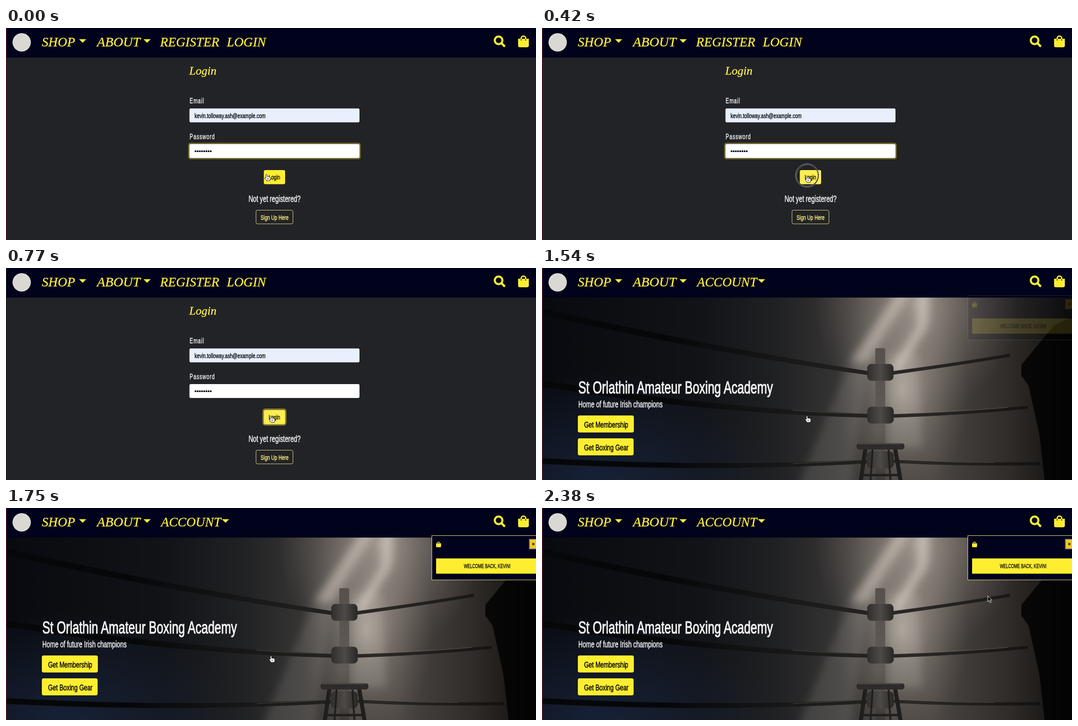
An HTML page for the animation above (2520 ms loop, 1183x473 px).

```html
<!DOCTYPE html>
<html lang="en">
<head>
<meta charset="utf-8">
<title>Login</title>
<style>
html, body { margin: 0; width: 100%; height: 100%; overflow: hidden; background: #222327; }
svg { display: block; width: 1183px; height: 473px; }
/* one condensed face for all body text */
.c {
  font-family: "Liberation Sans", Arial, sans-serif;
  transform: scaleX(.695); transform-box: fill-box; transform-origin: left;
  stroke: currentColor; stroke-width: .032em; fill: currentColor;
}
.m { text-anchor: middle; transform-origin: center; }
.label { font-size: 16px; letter-spacing: 1.4px; }
.s15 { font-size: 15px; }
.s19 { font-size: 19.2px; }
.script {
  font: italic 29px "Liberation Serif", "Times New Roman", serif;
  fill: #ffee2f; stroke: #ffee2f; stroke-width: .4px;
}
.y { fill: #ffee2f; }
.light { color: #f1f1f1; }
.dark { color: #08090c; }
</style>
</head>
<body>
<svg viewBox="0 0 1183 473">
  <defs>
    <linearGradient id="wall">
      <stop offset="0" stop-color="#080a0f"/>
      <stop offset=".3" stop-color="#111317"/>
      <stop offset=".45" stop-color="#212224"/>
      <stop offset=".6" stop-color="#3e3b39"/>
      <stop offset=".74" stop-color="#4b4642"/>
      <stop offset=".88" stop-color="#302c2a"/>
      <stop offset="1" stop-color="#0d0c0b"/>
    </linearGradient>
    <radialGradient id="glow">
      <stop offset="0" stop-color="#d5ccc1" stop-opacity=".62"/>
      <stop offset=".4" stop-color="#b5aaa0" stop-opacity=".36"/>
      <stop offset="1" stop-color="#8a8178" stop-opacity="0"/>
    </radialGradient>
    <radialGradient id="navy">
      <stop offset="0" stop-color="#1d2b49" stop-opacity=".7"/>
      <stop offset="1" stop-color="#1d2b49" stop-opacity="0"/>
    </radialGradient>
    <linearGradient id="post" x2="0" y2="1">
      <stop offset="0" stop-color="#55504b"/>
      <stop offset=".6" stop-color="#625c57"/>
      <stop offset="1" stop-color="#3a3735"/>
    </linearGradient>
    <linearGradient id="pad">
      <stop offset="0" stop-color="#302e2c"/>
      <stop offset=".5" stop-color="#4d4946"/>
      <stop offset="1" stop-color="#2a2826"/>
    </linearGradient>
    <linearGradient id="rope" gradientUnits="userSpaceOnUse" x1="0" x2="1110">
      <stop offset=".25" stop-color="#060708"/>
      <stop offset=".5" stop-color="#191919"/>
      <stop offset=".75" stop-color="#2b2927"/>
      <stop offset="1" stop-color="#141211"/>
    </linearGradient>
    <filter id="soft" x="-30%" y="-30%" width="160%" height="160%"><feGaussianBlur stdDeviation="9"/></filter>
    <clipPath id="stage"><rect y="66" width="1183" height="407"/></clipPath>
    <g id="bag">
      <path d="M0 8H24V23Q24 27 20 27H4Q0 27 0 23Z"/>
      <path d="M7 12V7a5 5 0 0 1 10 0V12" fill="none" stroke="#ffee2f" stroke-width="3"/>
      <path d="M7 9V12M17 9V12" stroke="#01031c" stroke-width="1.6"/>
    </g>
    <path id="caret" class="y" d="M0 0H16L8 8Z"/>
  </defs>

  <g id="form">
    <rect y="66" width="1183" height="407" fill="#222327"/>
    <text class="script" x="409" y="104" style="font-size:26px;fill:#fff15a">Login</text>
    <text class="c label light" x="410" y="168">Email</text>
    <rect x="409.5" y="179.5" width="379.5" height="31" rx="3" fill="#e8f0fe"/>
    <text class="c dark" x="421" y="201" font-size="15.2">kevin.tolloway.ash@example.com</text>
    <text class="c label light" x="410" y="248">Password</text>
    <rect id="fieldGlow" x="406.5" y="256" width="385.5" height="37" rx="5" fill="#6f672b"/>
    <rect x="409.5" y="259" width="379.5" height="31" rx="3" fill="#fff"/>
    <path d="M423 275H458" stroke="#08090c" stroke-width="4.2" stroke-linecap="round" stroke-dasharray="0 4.86"/>
    <rect id="btnGlow" x="572.5" y="313.5" width="53.5" height="38" rx="6" fill="#857c2e"/>
    <rect id="btn" x="575.5" y="317" width="47.5" height="31.5" rx="3.5"/>
    <text class="c m s15 dark" x="599" y="338">Login</text>
    <text class="c m light" x="599.5" y="388" font-size="19.8">Not yet registered?</text>
    <rect x="558" y="406.5" width="82.5" height="30.5" rx="3.5" fill="none" stroke="#e9e08a"/>
    <text class="c m s15" x="599.5" y="428" color="#fff27a">Sign Up Here</text>
  </g>

  <g id="home">
    <g clip-path="url(#stage)">
      <rect y="66" width="1183" height="407" fill="url(#wall)"/>
      <ellipse cx="120" cy="490" rx="400" ry="260" fill="url(#navy)"/>
      <ellipse cx="835" cy="80" rx="230" ry="250" fill="url(#glow)"/>
      <ellipse cx="805" cy="270" rx="150" ry="260" fill="url(#glow)"/>
      <g filter="url(#soft)" fill="#e6ddd3">
        <path d="M800 50H832L725 230L690 490H570L670 250Z" opacity=".13"/>
        <path d="M795 50H822L725 210H685Z" opacity=".38"/>
        <path d="M838 50H866L862 130L800 230H775L835 130Z" opacity=".5"/>
        <path d="M775 190H840L850 400H770Z" opacity=".16"/>
      </g>
      <path d="M1183 110L1143 128L1070 216V240L1086 262L1110 370L1122 473H1183Z" opacity=".8"/>
      <g fill="url(#rope)">
        <path d="M0 90Q380 176 728 230V239Q380 190 0 105Z"/>
        <path d="M0 250Q380 313 728 325V334Q380 326 0 265Z"/>
        <path d="M0 424Q380 445 728 427V436Q380 456 0 437Z"/>
        <path d="M784 230Q930 211 1045 191V198Q930 218 784 238Z"/>
        <path d="M784 326Q950 321 1085 307V314Q950 328 784 334Z"/>
        <path d="M784 427Q940 435 1112 433V440Q940 443 784 435Z"/>
      </g>
      <path d="M560 317Q640 324 726 325M786 326Q920 321 1040 311M560 436Q650 433 726 427M786 427Q900 434 1010 434" fill="none" stroke="#8c8068" opacity=".5"/>
      <rect x="744" y="179" width="22" height="300" rx="3" fill="url(#post)"/>
      <g fill="url(#pad)">
        <rect x="726" y="214" width="58.5" height="37.5" rx="9"/>
        <rect x="726" y="309.5" width="59" height="37.5" rx="9"/>
        <rect x="725" y="409" width="60" height="38" rx="9"/>
      </g>
      <g fill="none" stroke="#1f1e1d" stroke-width="9">
        <path d="M722 402L711 478M788 402L801 478"/>
        <path d="M738 402L733 478M773 402L778 478" stroke-width="4"/>
        <path d="M716 462H796" stroke-width="5"/>
      </g>
      <rect x="702" y="391" width="107" height="14" rx="6" fill="#2e2b2a"/>
      <path d="M707 392.5H804" stroke="#6a645d"/>
    </g>
    <text class="c light" x="81" y="280" font-size="38">St Orlathin Amateur Boxing Academy</text>
    <text class="c light" x="81" y="311" font-size="19.5">Home of future Irish champions</text>
    <rect class="y" x="80" y="329" width="125" height="38" rx="4"/>
    <text class="c s19 dark" x="94" y="356">Get Membership</text>
    <rect class="y" x="80" y="380" width="124.5" height="38" rx="4"/>
    <text class="c s19 dark" x="94" y="407">Get Boxing Gear</text>
  </g>

  <rect width="1183" height="66" fill="#01031c"/>
  <circle cx="35" cy="32" r="20.5" fill="#d9d8d2"/>
  <text class="script" x="80" y="41">SHOP</text>
  <use href="#caret" x="163" y="25"/>
  <text class="script" x="203" y="41" style="font-size:30px">ABOUT</text>
  <use href="#caret" x="307" y="25"/>
  <g id="guest">
    <text class="script" x="344" y="41">REGISTER</text>
    <text class="script" x="493" y="41">LOGIN</text>
  </g>
  <g id="member">
    <text class="script" x="346" y="41">ACCOUNT</text>
    <use href="#caret" x="482" y="25"/>
  </g>
  <g fill="none" stroke="#ffee2f" stroke-width="4.5">
    <circle cx="1099.5" cy="27.5" r="8.5"/>
    <path d="M1105.5 33.5L1113.5 41.5" stroke-width="5"/>
  </g>
  <use href="#bag" class="y" x="1143" y="16"/>

  <g id="toast">
    <rect x="950.5" y="61.5" width="240" height="99" fill="#01031c" stroke="#f3e684"/>
    <use href="#bag" class="y" transform="translate(960 75) scale(.46)"/>
    <rect x="1168.5" y="70" width="22" height="21" fill="#f8c915" stroke="#8b8b8b" stroke-width="2"/>
    <path d="M1174.5 78L1179.5 83M1179.5 78L1174.5 83" stroke="#111" stroke-width="1.4"/>
    <rect class="y" x="960" y="112.500" width="230" height="34"/>
    <text class="c m dark" x="1074" y="134.5" font-size="12.5">WELCOME BACK, KEVIN!</text>
  </g>

  <rect id="edge" width="1.8" height="473"/>
  <g id="ring" fill="none">
    <circle r="25" stroke="#111" stroke-width="2"/>
    <circle r="26" stroke="#c4c4c4" stroke-width=".9"/>
    <circle r="23.8" stroke="#999" stroke-width=".8"/>
  </g>
  <path id="hand" fill="#fff" stroke="#111" d="M-2 1.5Q-.5-1 1 1.5V6Q2 4.5 3.5 6Q5 5 6 6.5Q8 6 8 8.5V11L6.5 15H-.5L-4.5 9Q-4.5 7-2 8.5ZM1 9V12M3.5 9V12"/>
  <path id="arrow" fill="#080808" stroke="#f4f4f4" d="M0 0V13L3 10.3L5.2 15.3L7.5 14.3L5.3 9.4H9.3Z"/>
</svg>
<script>
const LOOP = 2520, STEP = 70;
const el = id => document.getElementById(id);
const set = (id, name, value) => el(id).setAttribute(name, value);
const show = (id, on) => set(id, "opacity", Number(on));
const span = (t, a, b) => Math.min(1, Math.max(0, (t - a) / (b - a)));
const mix = (a, b, p) => a + (b - a) * p;
const smooth = p => p * p * (3 - 2 * p);
const place = (id, x, y, scale = 1) => set(id, "transform", `translate(${x} ${y}) scale(${scale})`);

function draw(now) {
  const t = Math.floor(now % LOOP / STEP) * STEP;
  const home = t >= 1540;
  for (const id of ["home", "member"]) show(id, home);
  for (const id of ["form", "guest"]) show(id, !home);

  const approach = smooth(span(t, 0, 280));
  place("hand", mix(582, 592, approach), mix(326, 329.5, approach));
  set("btn", "fill", `rgb(255 238 ${mix(45, 80, approach)})`);

  // click ring, then focus passes from the field to the button
  const click = span(t, 420, 630);
  show("ring", t < 420 ? 0 : 1 - click);
  place("ring", 592, 329, 1 + click * .25);
  const focus = smooth(span(t, 420, 700));
  show("fieldGlow", 1 - focus);
  show("btnGlow", focus);
  set("edge", "fill", t >= 770 && !home ? "#17181c" : "#45151f");

  show("toast", home ? mix(.13, 1, span(t, 1540, 1750)) : 0);

  const away = span(t, 2240, 2380);
  show("hand", t < 2240);
  show("arrow", t >= 2240);
  place("arrow", mix(729, 995, away), mix(243, 196, away));
}

const start = performance.now();
(function tick() {
  draw(performance.now() - start);
  requestAnimationFrame(tick);
})();
</script>
</body>
</html>
```
